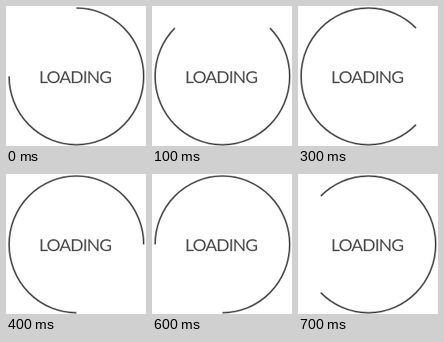
Recreate the animation shown at these times as an HTML page with a canvas. Size 176 by 176 pixels, loop 800 ms.

```html
<!DOCTYPE html>
<html lang="en">
<head>
<meta charset="utf-8">
<title>Loading</title>
<style>
html, body { margin: 0; width: 100%; height: 100%; overflow: hidden; background: #fff; }
canvas { display: block; width: 176px; height: 176px; }
</style>
</head>
<body>
<canvas id="stage" width="176" height="176"></canvas>
<script>
const ctx = document.getElementById('stage').getContext('2d');
const SIZE = 176, STEP_MS = 100, STEPS = 8;
const INK = '#4d4d4f';
const ring = { x: 88.5, y: 88.5, rx: 84.6, ry: 85.9, width: 2 };

function drawRing(step) {
  // Three quarters of a ring, turned clockwise by an eighth per step.
  const start = -Math.PI / 2 + step * Math.PI / 4;
  ctx.strokeStyle = INK;
  ctx.lineWidth = ring.width;
  ctx.beginPath();
  ctx.ellipse(ring.x, ring.y, ring.rx, ring.ry, 0, start, start + Math.PI * 1.5);
  ctx.stroke();
}

function drawLabel() {
  ctx.fillStyle = INK;
  ctx.font = '400 22px Lato, "Open Sans", sans-serif';
  ctx.letterSpacing = '-1.1px';
  ctx.textAlign = 'left';
  ctx.textBaseline = 'alphabetic';
  ctx.fillText('LOADING', 41.5, 97);
}

function frame() {
  const step = Math.floor(performance.now() / STEP_MS) % STEPS;
  ctx.fillStyle = '#fff';
  ctx.fillRect(0, 0, SIZE, SIZE);
  drawRing(step);
  drawLabel();
  requestAnimationFrame(frame);
}
frame();
</script>
</body>
</html>
```
